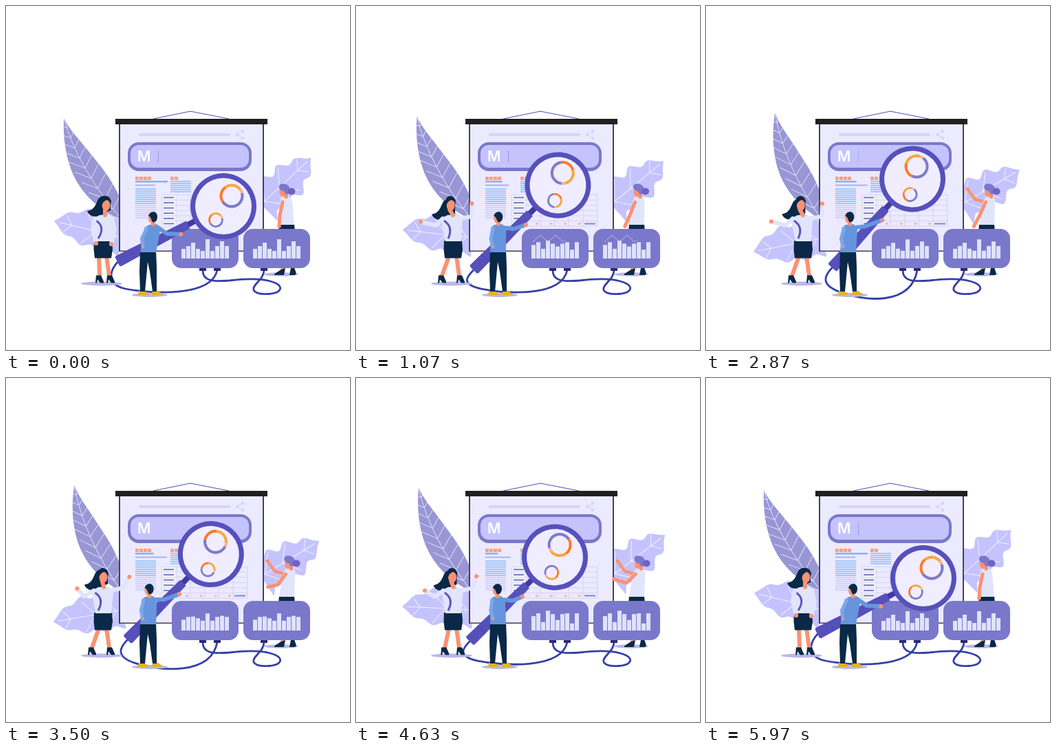
Animation, 500 px wide and 500 px high, one loop 6.01 s. Source, as an HTML page with a canvas:

```html
<!DOCTYPE html>
<html lang="en">
<head>
<meta charset="utf-8">
<title>Data search</title>
<style>
html, body { margin: 0; width: 100%; height: 100%; overflow: hidden; background: #fff; }
canvas { display: block; width: 500px; height: 500px; }
</style>
</head>
<body>
<canvas id="stage" width="500" height="500"></canvas>
<script>
const ctx = document.getElementById('stage').getContext('2d');
const LOOP = 6010, TAU = Math.PI * 2, RAD = Math.PI / 180;
const NAVY = '#0a2847', SKIN = '#fb9272', CLOTH = '#e0e5fc', LILAC = '#c5c3fd',
  VIOLET = '#7a78cb', INDIGO = '#5650bb', WIRE = '#3540a6', PANEL = '#eceaff',
  SHADE = '#b9b8ea', SHIRT = '#6695de', GOLD = '#e5b21e', PALE = '#d9d2f7';

const clamp = v => Math.max(0, Math.min(1, v));
const wave = (t, n) => Math.cos(TAU * n * t / LOOP);
const lerp = (a, b, u) => a + (b - a) * u;
const mix = (p, q, u) => [lerp(p[0], q[0], u), lerp(p[1], q[1], u)];
const ease = (t, from, to) => {
  const u = clamp((t - from) / (to - from));
  return u * u * (3 - 2 * u);
};
// Looping motion: a mean, three cosine harmonics and one sine
const cycle = (t, mean, a, b, c, s = 0) => mean + a * wave(t, 1) + b * wave(t, 2)
  + c * wave(t, 3) + s * Math.sin(TAU * t / LOOP);

function line(pts, color, width) {
  ctx.beginPath();
  pts.forEach(p => ctx.lineTo(p[0], p[1]));
  ctx.strokeStyle = color;
  ctx.lineWidth = width;
  ctx.stroke();
}
function poly(pts, color) {
  ctx.beginPath();
  pts.forEach(p => ctx.lineTo(p[0], p[1]));
  ctx.closePath();
  ctx.fillStyle = color;
  ctx.fill();
}
function shape(d, color) {
  ctx.fillStyle = color;
  ctx.fill(new Path2D(d));
}
function path(d, color, width) {
  ctx.strokeStyle = color;
  ctx.lineWidth = width;
  ctx.stroke(new Path2D(d));
}
function oval(x, y, rx, ry, color, tilt = 0) {
  ctx.beginPath();
  ctx.ellipse(x, y, rx, ry, tilt, 0, TAU);
  ctx.fillStyle = color;
  ctx.fill();
}
function box(x, y, w, h, color, r = 0) {
  ctx.beginPath();
  ctx.roundRect(x, y, w, h, r);
  ctx.fillStyle = color;
  ctx.fill();
}
function placed(x, y, angle, draw) {
  ctx.save();
  ctx.translate(x, y);
  ctx.rotate(angle);
  draw();
  ctx.restore();
}

// Lobed leaf along +x: rippled edge, midrib and a vein pair per lobe
function lobedLeaf(length, width, ripple) {
  const half = u => width * (1 - u ** 4) * (1 + ripple * Math.cos(TAU * u / 0.28));
  const edge = [];
  for (let u = 0; u <= 1; u += 0.02) edge.push([length * u, -half(u) * 0.85]);
  edge.push([length, 0]);
  for (let u = 1; u >= 0; u -= 0.02) edge.push([length * u, half(u)]);
  poly(edge, LILAC);
  let veins = `M0 0H${length * 0.93}`;
  for (const u of [0.28, 0.56, 0.84]) {
    const x = length * u, h = half(u) * 0.75;
    veins += `M${x} ${-h}L${x - h * 0.8} 0L${x} ${h}`;
  }
  path(veins, '#f1f0ff', 1);
}

function plume() {
  const outline = 'M84 163Q82 210 98 246Q118 289 170 312L168 284Q157 258 140 236Q121 212 105 193Q91 177 84 163Z';
  shape(outline, '#9896d4');
  ctx.clip(new Path2D(outline));
  let veins = 'M84 163Q104 235 168 310';
  for (let u = 0.1; u < 1; u += 0.1) {
    const v = 1 - u;
    const x = 84 * v * v + 208 * u * v + 168 * u * u;
    const y = 163 * v * v + 470 * u * v + 310 * u * u;
    veins += `M${x - 24} ${y - 9}L${x} ${y}L${x + 11} ${y - 22}`;
  }
  path(veins, '#dedcfa', 1);
}

function leaves(k) {
  placed(170, 337, Math.PI + 0.24 - 0.44 * k, () => lobedLeaf(103, 29, 0.12));
  placed(166, 308, 0.109 * k, () => {
    ctx.translate(-166, -308);
    plume();
  });
  placed(370, 289, -0.75 + 0.215 * k, () => lobedLeaf(100, 28, 0.22));
}

function screen(t) {
  line([[214, 164], [268, 153], [324, 164]], INDIGO, 1.2);
  box(164, 170, 211, 187, '#454348');
  box(166, 172, 207, 183.5, PANEL);
  box(159, 164, 221, 8, '#231f20');

  box(193, 185, 133, 4, PALE, 2);
  const share = [[344, 182], [336, 187], [344, 192]];
  line(share, PALE, 1.2);
  share.forEach(p => oval(p[0], p[1], 2.2, 2.2, PALE));

  box(177, 198, 180, 42, VIOLET, 16);
  box(181, 202, 172, 33, LILAC, 12);
  ctx.fillStyle = '#fff';
  ctx.font = '600 21px Inter, sans-serif';
  ctx.fillText('M', 191, 226);
  ctx.globalAlpha = clamp((wave(t, 6) - 0.48) / 0.45);
  box(221, 210, 1, 18, '#9a97d2');
  ctx.globalAlpha = 1;

  for (const [x, n] of [[188, 4], [239, 2]])
    for (let i = 0; i < n; i++) box(x + 6 * i, 248, 5, 5, '#f9a186');
  box(188, 254, cycle(t, 28, 8, 11, 0), 2.5, '#86b2ee');
  box(188, 259.5, cycle(t, 38, -9, 0, 0), 2, '#a9b4ee');
  for (let i = 0; i < 15; i++) box(188, 265 + 3 * i, 30, 2, i < 8 ? '#a3c7f8' : '#d5d2f6');
  for (let i = 0; i < 6; i++) box(239, 254 + 3 * i, 30, 2, '#a3c7f8');

  box(226.5, 274, 20.5, 46, '#f4f3ff');
  let grid = '';
  for (let i = 0; i < 7; i++) grid += `M226 ${274.5 + 7.6 * i}H351M${226.5 + 20.7 * i} 274V320`;
  path(grid, '#d3d0f1', 0.9);
  for (let i = 0; i < 6; i++) box(229, 277.5 + 7.6 * i, 15, 1.8, '#6d70b8');
  for (let i = 0; i < 4; i++) box(261 + 20.7 * i, 315.5, 4, 2, '#f9a977');
  box(332, 315.5, 16, 2, '#7f83cf');
}

function limb(pts, color, width) {
  ctx.lineCap = ctx.lineJoin = 'round';
  line(pts, color, width);
  ctx.lineCap = 'butt';
  ctx.lineJoin = 'miter';
}
function arm(pts, color, width, hand = 3) {
  limb(pts, color, width);
  oval(...pts[pts.length - 1], hand, hand, SKIN);
}
function heel(x, y, dir) {
  placed(x, y, 0, () => {
    ctx.scale(dir, 1);
    shape('M-4 -11L3 -11L7 -2V0H2L-2 -5L-3 0H-5Z', NAVY);
  });
}

function rightWoman(t) {
  const reach = ease(t, 1900, 2750) - ease(t, 5250, 5950);
  const push = ease(t, 3000, 3900) - ease(t, 4600, 5800);
  const dx = lerp(3 - 3 * wave(t, 3), 7.5, reach);
  const shoulder = [402 + dx * 0.6, 285];
  oval(400, 390, 25, 2.8, SHADE);
  limb([[403, 375], [401, 386]], SKIN, 5);
  limb([[416, 375], [417, 386]], SKIN, 4.5);
  poly([[400, 383], [406, 381], [404, 391], [390, 391], [390, 389.5]], NAVY);
  poly([[414, 381], [419, 380], [422, 389], [420, 391], [412, 391]], NAVY);

  arm([shoulder, mix([400, 302], [391, 281], reach), mix([399, 318], [380, 266], reach)], SKIN, 4.5, 2.4);
  poly([[397, 317], [419, 317], [421, 340], [395, 340]], NAVY);
  poly([[400 + dx, 276], [411 + dx, 276], [416 + dx * 0.6, 283], [419, 318], [397, 318],
    [398 + dx * 0.6, 285]], CLOTH);
  arm([shoulder, mix([398, 304], [393, 298], push), mix([397 - dx, 320], [375, 292], push)], SKIN, 5, 2.6);

  limb([[406 + dx, 272], [407 + dx, 277]], SKIN, 6);
  oval(402.5 + dx, 270, 5, 7.5, SKIN);
  oval(404.5 + dx, 264, 8, 5.5, VIOLET, 0.3);
  oval(408 + dx, 269, 3.5, 5, VIOLET);
  oval(415 + dx * 0.95, 269.5, 5.5, 5, '#6f62c3');
}

const BARS = [14, 18, 23, 14, 11, 28, 11, 18, 25, 18];

// Zigzag drawn between two fractions of its length
function trend(from, to) {
  const spot = i => [257 + 11 * i, i % 2 ? 333 : 343];
  const on = u => mix(spot(Math.floor(u * 6)), spot(Math.floor(u * 6) + 1), u * 6 % 1);
  const pts = [on(from)];
  for (let i = 1; i < 6; i++) if (i / 6 > from && i / 6 < to) pts.push(spot(i));
  line([...pts, on(to)], '#bebcf0', 1);
}

function card(x, t) {
  placed(x, 0, 0, () => {
    box(241, 324, 97, 57, VIOLET, 14);
    const swap = (1 - wave(t, 2)) / 2;
    BARS.forEach((low, i) => {
      const h = lerp(low, 39 - low + (i % 2 ? 4 : -4), swap);
      box(255 + 7 * i, 367 - h, 6, h, '#dfe2ff');
    });
    const head = clamp((t - 500) / 800), tail = clamp((t - 1500) / 900);
    if (head > tail) trend(tail, head);
  });
}

function wires([x, y], k) {
  const sag = 12 * k ** 5;
  path(`M${x} ${y}C${x - 10} ${y + 10} ${x - 22} 404 ${x + 10} ${411 + sag * 0.4}`
    + `C${x + 46} ${418 + sag} 298 ${424 + sag} 307 384`, WIRE, 2.8);
  path('M286 384C286 400 300 401 325 399C350 396 370 396 384 400C399 404 403 411 394 416'
    + 'C384 420 364 420 360 413C357 405 375 398 375 384', WIRE, 2.8);
  for (const px of [281, 302, 370]) box(px, 380, 10, 5, '#2b2b72');
}

function leftWoman(t) {
  const c = wave(t, 3), dx = 4 * c - 4, mid = dx * 0.4, drop = -0.6 * dx;
  const inward = (c + 1) / 2;
  const lift = ease(t, 100, 1000) - ease(t, 5150, 5950);
  const foot = 135 - 11 * (ease(t, 50, 950) - ease(t, 4250, 5150));

  oval(139, 403.5, 30, 3, SHADE);
  limb([[135, 364], [foot + 1, 392]], SKIN, 6);
  limb([[146, 364], [150, 392]], SKIN, 6);
  heel(foot, 402.5, 1);
  heel(151, 402.5, 1);

  placed(dx, drop, 0, () => shape('M152 283C148 274 138 274 134 281C130 289 129 296 118 298'
    + 'C121 306 129 307 136 305C142 304 144 299 152 297Z', NAVY));
  poly([[128, 341], [154, 341], [155, 354], [153, 366.5], [129, 366.5], [127.5, 354]], NAVY);
  poly([[136 + mid, 304], [150 + mid, 303], [158 + mid, 308], [153, 342], [130, 342],
    [126 + mid, 309]], CLOTH);
  path(`M${131 + mid} 312Q${145 + mid} 321 134 338`, '#5b55b8', 3);

  const left = [[126, 325], mix([116, 319], [111, 316], inward)];
  const leftHand = [[131, 345], mix([94, 314], [113, 298], inward)];
  const right = [[158, 326], mix([168, 306], [172, 304], inward)];
  const rightHand = [[153, 346], mix([168, 287], [191, 291], inward)];
  arm([[129 + mid, 309], mix(...left, lift), mix(...leftHand, lift)], CLOTH, 6);
  arm([[154 + mid, 309], mix(...right, lift), mix(...rightHand, lift)], CLOTH, 6);

  limb([[144 + dx, 296], [144 + mid, 304]], SKIN, 6);
  oval(145.5 + dx, 289.5, 6, 8, SKIN);
  placed(dx, 0, 0, () => shape('M139 290Q136 277 145 276Q153 277 153 287Q149 282 146 282Q141 284 139 290Z', NAVY));
}

const SLICES = [['#ff7a22', 150], ['#f5a73a', 235], ['#fbb38c', 325], ['#7e7acb', 345]];
function donut(x, y, r, width, spin) {
  SLICES.forEach(([color, from], i) => {
    const to = i < 3 ? SLICES[i + 1][1] : 510;
    ctx.beginPath();
    ctx.arc(x, y, r, from * RAD + spin, to * RAD + spin);
    ctx.strokeStyle = color;
    ctx.lineWidth = width;
    ctx.stroke();
  });
}

function magnifier(lens, angle, turn, t) {
  placed(...lens, angle, () => {
    box(46, -4, 18, 8, '#3f3aa2');
    shape('M58 -6L145 -8L172 -8.5Q174 -8 174 -6V6Q174 8 172 8.5L145 8L58 6Z', INDIGO);
    line([[150, -8], [150, 8]], '#4a45ae', 1);
  });
  placed(...lens, turn, () => {
    oval(0, 0, 48, 48, INDIGO);
    oval(0, 0, 41, 41, '#efedff');
    const spin = TAU * 2 * t / LOOP;
    donut(12, -15, 15.5, 4, spin);
    donut(-11, 20, 9.5, 2.8, spin);
  });
}

function man(lens, hand) {
  const dx = (lens[0] - 293) * 0.3;
  oval(209, 420, 26, 3, SHADE);
  for (const x of [193, 213]) shape(`M${x} 414H${x + 8}L${x + 14} 418V420H${x - 1}Z`, GOLD);
  poly([[195, 355], [218, 355], [219, 380], [219, 415], [213, 415], [209, 386], [206, 372],
    [202, 415], [195, 415], [194, 385]], NAVY);

  poly([[201 + dx, 318], [212 + dx, 317], [218 + dx, 322], [218, 358], [195, 358],
    [196 + dx * 0.8, 322]], SHIRT);
  arm([[214 + dx, 322], [229 + dx * 0.7, (322 + hand[1]) / 2 + 4], hand], SHIRT, 6);
  arm([[199 + dx * 0.8, 323], [196 + dx * 0.2, 338], [199, 350]], '#7ba7e8', 5, 2);

  limb([[206 + dx, 311], [207 + dx, 317]], SKIN, 6);
  oval(205 + dx, 309, 5, 6.5, SKIN);
  placed(dx, 0, 0, () => shape('M200 305Q202 299 208 299Q214 301 213 308Q212 315 206 314L203 307Z', NAVY));
}

function draw(t) {
  ctx.fillStyle = '#fff';
  ctx.fillRect(0, 0, 500, 500);
  const k = (1 - wave(t, 1)) / 2;
  const lens = [cycle(t, 298.3, 6.3, 9.8, 1.6), cycle(t, 264.7, 14.8, 6.5, 5, -2)];
  const deg = cycle(t, 138, 7.6, 4.3, 2.5, -1.5);
  const angle = deg * RAD, turn = (deg - 152.4) * RAD;
  const along = (a, d) => [lens[0] + d * Math.cos(a), lens[1] + d * Math.sin(a)];

  leaves(k);
  screen(t);
  rightWoman(t);
  wires(along(angle, 172), k);
  card(0, t);
  card(104, t);
  leftWoman(t);
  magnifier(lens, angle, turn, t);
  man(lens, along(angle - 5.9 * RAD, 74));
}

const start = performance.now();
function frame() {
  draw((performance.now() - start) % LOOP);
  requestAnimationFrame(frame);
}
frame();
</script>
</body>
</html>
```
